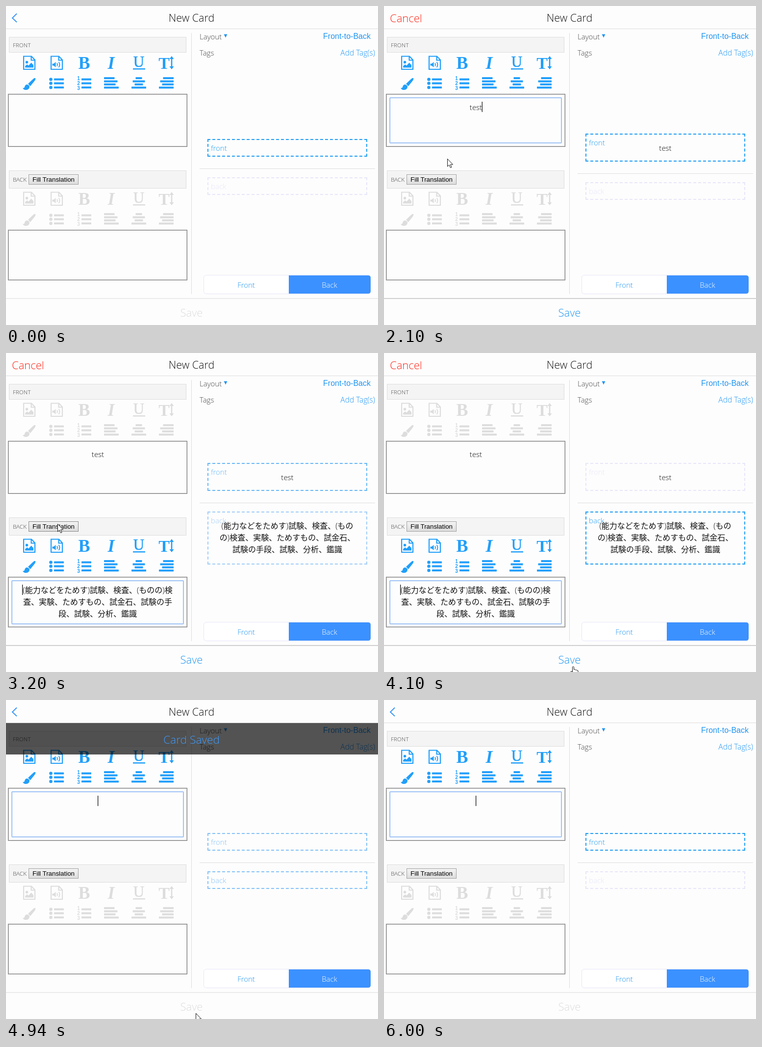
Write an HTML page that moves like this. It is 759 px wide and 650 px high and loops after 6140 ms.

```html
<!DOCTYPE html>
<html lang="ja">
<head>
<meta charset="utf-8">
<title>New Card</title>
<style>
html, body { margin: 0; width: 100%; height: 100%; overflow: hidden; background: #fdfdfd; }
svg { position: absolute; left: 0; top: 0; }
text, .card { font: 300 15px "Open Sans", "Noto Sans CJK JP", "Noto Sans CJK", sans-serif; }
text.big { font-size: 22px; }
text.cap { font-size: 11.7px; fill: #444; }
text.arial { font: 16px "Liberation Sans", Arial, sans-serif; }
text.ja, .card p { font-size: 16px; font-weight: 350; }
.mid { text-anchor: middle; }
.blue { fill: #2196f3; }
.serif { font: bold 36px "Liberation Serif", serif; }
.line { fill: none; stroke: #ddd; }
.bar { fill: #f4f4f4; stroke: #ddd; }
.box { fill: #fff0; stroke: #777; }
.box2 { fill: none; stroke: #ccc; }
.ring { fill: none; stroke: #9fc3f6; stroke-width: 2; }
.card { position: absolute; left: 411px; width: 326px; box-sizing: border-box; border: 2px dashed; }
.card span { position: absolute; left: 5px; top: 5px; line-height: 22px; }
.card p { position: absolute; left: 0; right: 0; top: 15px; margin: 0; line-height: 24px;
  text-align: center; white-space: pre; color: #111; }
#typed, #front p { font-size: 15px; font-weight: 300; }
</style>
</head>
<body>
<svg width="759" height="650">
  <defs>
    <g id="tools" fill="currentColor">
      <g fill="none" stroke="currentColor" stroke-width="2.2">
        <path id="file" d="M36 102.500H52L59 110V129H36ZM51.500 102.500V110.500H59"/>
        <use href="#file" x="56"/>
        <path d="M104 116.500q2 3 0 6M107.500 114q4 5.500 0 11" stroke-width="1.800"/>
      </g>
      <circle cx="42.500" cy="114.500" r="2.700"/>
      <path d="M39 125.500v-3l4-3.500 3 2.500 5.500-6 4.500 5v5z"/>
      <path d="M94.500 117.500h3l4-3.500v11l-4-3.500h-3z"/>
      <text class="serif mid" x="159.500" y="128">B</text>
      <text class="serif mid" x="214.500" y="128" font-style="italic" style="font-style:italic">I</text>
      <text class="serif mid" x="271" y="124" style="font-size:31px;font-weight:400" stroke="currentColor" stroke-width=".7">U</text>
      <path d="M259 127h25v2.500h-25z"/>
      <text class="serif mid" x="322.500" y="128" style="font-size:34px">T</text>
      <path d="M338 102l4.500 6h-3.200v15h3.200l-4.500 6-4.500-6h3.200v-15h-3.200z"/>
      <path d="M60 147q-2-1-5 2l-10 9.500 4.500 5 8.500-10.500q3-4 2-6z"/>
      <path d="M43 160q5 1 5 5-1 6-8 6-4 0-6-4 3 1 4-2 1-5 5-5z"/>
      <g id="bars"></g>
    </g>
  </defs>

  <text class="big mid" x="378.500" y="32" fill="#111" style="font-size:21.500px">New Card</text>
  <path id="chevron" d="M22 15.500L13 24.500L22 33" fill="none" stroke="#3a97f5" stroke-width="2"/>
  <text id="cancel" class="big" x="12" y="33" fill="#ff2416">Cancel</text>
  <path class="line" d="M0 46.500H759M378.500 55V587"/>
  <path id="foot" class="line" d="M0 596H759"/>
  <text id="save" class="big mid" x="378.500" y="633">Save</text>

  <rect class="bar" x="6.500" y="63.500" width="361" height="31"/>
  <text class="cap" x="14" y="84">FRONT</text>
  <rect class="bar" x="6.500" y="335.500" width="361" height="36"/>
  <text class="cap" x="14" y="358">BACK</text>
  <linearGradient id="grey" x2="0" y2="1"><stop stop-color="#f4f4f4"/><stop offset="1" stop-color="#dcdcdc"/></linearGradient>
  <rect id="fill" x="46.500" y="343.500" width="101" height="20" fill="url(#grey)"/>
  <text class="arial mid" x="97" y="358" style="font-size:13.330px">Fill Translation</text>

  <use id="tools1" href="#tools"/>
  <use id="tools2" href="#tools" y="277"/>

  <rect class="box2" x="5.500" y="180.500" width="363" height="105"/>
  <rect class="box" x="4.500" y="179.500" width="365" height="107"/>
  <rect class="box2" x="5.500" y="457.500" width="363" height="100"/>
  <rect class="box" x="4.500" y="456.500" width="365" height="102"/>
  <rect id="ring1" class="ring" x="12" y="187" width="350" height="92" rx="1"/>
  <rect id="ring2" class="ring" x="12" y="464" width="350" height="88" rx="1"/>
  <text id="typed" class="mid" x="187.500" y="212" fill="#111"></text>
  <g id="answer" fill="#111">
    <text class="ja mid" x="187" y="489">(能力などをためす)試験、検査、(ものの)検</text>
    <text class="ja mid" x="187" y="513">査、実験、ためすもの、試金石、試験の手</text>
    <text class="ja mid" x="187" y="537">段、試験、分析、鑑識</text>
  </g>
  <rect id="caret" width="1.200" height="21"/>

  <text x="395" y="68" fill="#444">Layout</text>
  <path class="blue" d="M444.500 57.500h7l-3.500 7z"/>
  <text class="arial blue" x="744" y="67" text-anchor="end">Front-to-Back</text>
  <text x="395" y="101" fill="#444">Tags</text>
  <text class="blue" x="753" y="101" text-anchor="end" style="font-size:15.500px">Add Tag(s)</text>
  <path id="split" class="line" d="M395 .5H753"/>

  <rect x="403.500" y="548.500" width="340" height="38" rx="5" fill="#fff" stroke="#e6e6fa"/>
  <path d="M577 549H739q5 0 5 5V581q0 5-5 5H577z" fill="#3b91ff"/>
  <text class="mid blue" x="490" y="574">Front</text>
  <text class="mid" x="660" y="574" fill="#fff">Back</text>

  <g id="banner">
    <path d="M0 47H759V111H0z" fill-opacity=".67"/>
    <text class="big mid" x="378.500" y="89" fill="#3d9bff" style="font-size:22.800px">Card Saved</text>
  </g>
</svg>

<div id="front" class="card"><span>front</span><p></p></div>
<div id="back" class="card"><span>back</span><p></p></div>

<svg width="759" height="650">
  <g id="pointer" fill="#fff" stroke="#111">
    <path id="arrow" d="M.5 .5V16L4 12.800L6.500 18.500L9 17.500L6.500 12H11.500Z"/>
    <path id="beam" d="M-3 -6.500H-1L0 -5.500L1 -6.500H3M0 -5.500V6M-3 7H-1L0 6L1 7H3" fill="none" stroke-width="1.400"/>
    <path id="hand" d="M-1.500 12V2q1.500-3 3 0v5q2-1 3 .8 2-.8 3 .8 2-.5 2.500 1.400V15l-2 5H1L-5 12q0-3 3.500 0z"/>
  </g>
</svg>

<script>
const $ = id => document.getElementById(id);
const LOOP = 6140, BLUE = [33, 158, 245], PALE = [230, 230, 250];
const PREVIEW = '(能力などをためす)試験、検査、(もの\nの)検査、実験、ためすもの、試金石、\n試験の手段、試験、分析、鑑識';
const KEYS = [1360, 1480, 1610, 1740];

// Pointer path: time, x, y
const PATHS = [
  [[30, 3, 259], [100, 3, 259]],
  [[640, 75, 238], [800, 159, 211], [1360, 159, 211]],
  [[1940, 159, 211], [2040, 147, 292], [2100, 129, 311], [2140, 129, 311], [2570, 105, 348],
   [3700, 105, 348], [3960, 360, 580], [4100, 386, 638], [4940, 387, 638], [5010, 387, 638], [5280, 480, 656]]
];

const ramp = (t, a, b) => Math.min(1, Math.max(0, (t - a) / (b - a)));
const within = (t, a, b) => t >= a && t < b;
const show = (id, on) => $(id).style.display = on ? '' : 'none';
const tint = k => `rgb(${BLUE.map((c, i) => Math.round(PALE[i] + (c - PALE[i]) * k))})`;

function pointerAt(t) {
  const path = PATHS.find(p => within(t, p[0][0], p[p.length - 1][0]));
  if (!path) return null;
  const i = path.findIndex(p => p[0] > t), a = path[i - 1], b = path[i];
  const u = ramp(t, a[0], b[0]);
  return [a[1] + (b[1] - a[1]) * u, a[2] + (b[2] - a[2]) * u];
}

function buildBars() {
  const bar = (x, y, w) => `<rect x="${x}" y="${y}" width="${w}" height="4" rx=".6"/>`;
  let out = '';
  [147.5, 155.5, 164].forEach((y, i) => {
    out += `<circle cx="91.500" cy="${y + 2}" r="3.300"/>` + bar(98, y, 20) + bar(154, y, 20) +
      `<text class="arial mid" x="148" y="${151 + i * 10}" style="font-size:10px;font-weight:bold">${i + 1}</text>`;
  });
  [[21.5, 13], [27.5, 25], [23.5, 17], [30, 30]].forEach(([side, mid], i) => {
    const y = 145 + i * 6.4;
    out += bar(200, y, side) + bar(271 - mid / 2, y, mid) + bar(342 - side, y, side);
  });
  $('bars').innerHTML = out;
}

function card(id, top, height, k, text) {
  const el = $(id);
  el.style.top = top + 'px';
  el.style.height = height + 'px';
  el.style.color = tint(k);
  el.lastChild.textContent = text;
}

function draw(t) {
  const saved = t >= 4700;
  const word = saved ? '' : 'test'.slice(0, KEYS.filter(k => t >= k).length);
  const filled = within(t, 3060, 4700);
  const dirty = word !== '';

  show('chevron', !dirty);
  show('cancel', dirty);
  $('save').style.fill = dirty ? '#2196f3' : '#ddd';
  $('foot').style.stroke = dirty ? '#a2a2a2' : '#d8d8d8';
  $('tools1').style.color = filled ? '#ddd' : '#219ffa';
  $('tools2').style.color = filled ? '#219ffa' : '#ddd';
  show('ring1', within(t, 850, 2700) || saved);
  show('ring2', filled);
  $('typed').textContent = word;
  show('answer', filled);
  $('fill').style.stroke = within(t, 2480, 3780) ? '#888' : '#a0a0a0';

  // The caret restarts its blink at each focus or key press
  const since = [850, ...KEYS, 3060, 4740].filter(s => t >= s).pop();
  const focused = within(t, 850, 2700) || t >= 3060;
  const lit = within(t, 850, 1360) || (t - since) % 1020 < 510;
  show('caret', focused && lit);
  $('caret').setAttribute('x', filled ? 33 : dirty ? 187.5 + $('typed').getComputedTextLength() / 2 - .5 : 187);
  $('caret').setAttribute('y', filled ? 472 : 195);

  const k = 1 - ramp(t, 3060, 3460) + ramp(t, 4740, 5140);
  const top = filled ? 224 : dirty ? 260 : 271;
  const high = dirty ? 57 : 36;
  card('front', top, high, k, word);
  card('back', top + high + (dirty ? 42 : 42), filled ? 108 : 36, 1 - k, filled ? PREVIEW : '');
  $('split').setAttribute('transform', `translate(0 ${top + high + 24})`);

  $('banner').style.opacity = ramp(t, 4380, 4700) - ramp(t, 5620, 6000);

  const at = pointerAt(t);
  show('pointer', at);
  if (at) {
    const [x, y] = at;
    const kind = x > 11 && y < 287 ? 'beam' : y > 597 && dirty ? 'hand' : 'arrow';
    ['arrow', 'beam', 'hand'].forEach(id => show(id, id === kind));
    $('pointer').setAttribute('transform', `translate(${x} ${y})`);
  }
}

buildBars();
const start = performance.now();
(function tick() {
  draw((performance.now() - start) % LOOP);
  requestAnimationFrame(tick);
})();
</script>
</body>
</html>
```
